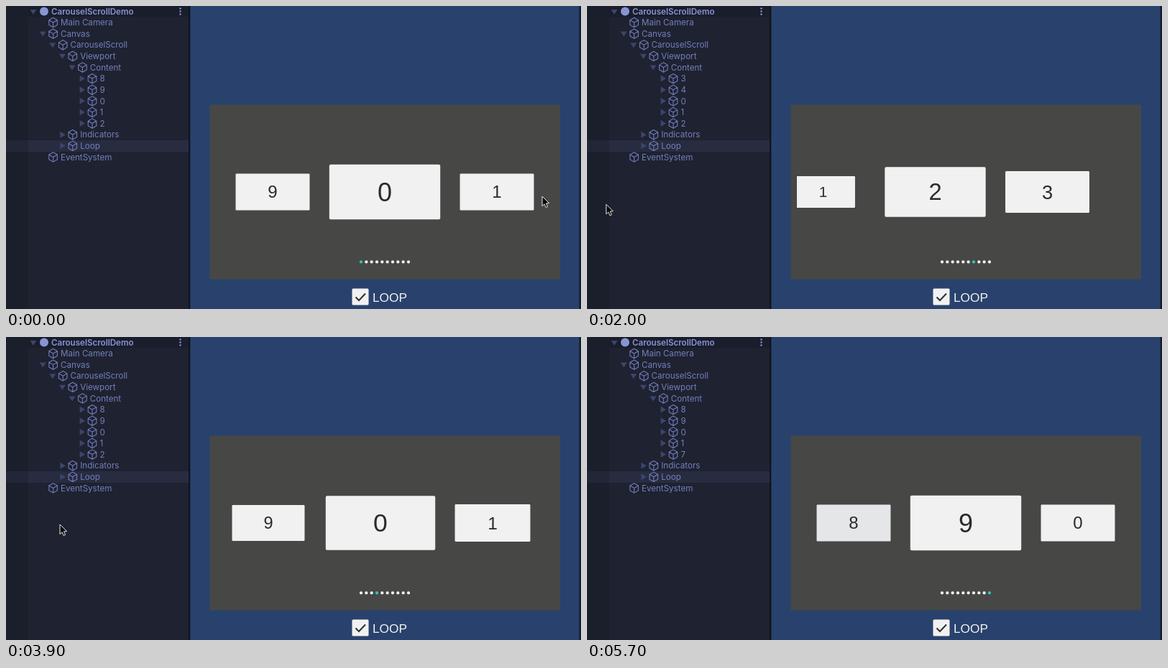
Recreate the animation shown at these times as an HTML page with a canvas. Size 800 px wide and 422 px high, loop 5.8 s.

```html
<!DOCTYPE html>
<html lang="en">
<head>
<meta charset="utf-8">
<title>Carousel scroll</title>
<style>
html, body { margin: 0; width: 100%; height: 100%; overflow: hidden; background: #29426d; }
canvas { display: block; width: 800px; height: 422px; }
</style>
</head>
<body>
<canvas id="stage" width="800" height="422"></canvas>
<script>
const ctx = document.getElementById('stage').getContext('2d');
const LOOP = 5800, STEP = 100;
const MID_X = 527, MID_Y = 259, GAP = 156;
const UI = 'Inter, "Noto Sans", sans-serif';
const SANS = '"Liberation Sans", Arial, sans-serif';

// Each flick: a drag until release, then a glide that settles on a card.
const flicks = [
  { start: 40, release: 300, from: 0, at: 4.2, to: 7, tau: 150 },
  { start: 1780, release: 1980, from: 7, at: 11.75, to: 16, tau: 152.5 },
  { start: 3000, release: 3200, from: 16, at: 18.48, to: 26, tau: 160 },
  { start: 3650, release: 3880, from: 25.55, at: 29.546, to: 33, tau: 130 },
  { start: 5020, release: 5260, from: 33, at: 37.2, to: 39, tau: 100 }
];

// Pointer path: time, x, y
const path = [
  [0, 746, 265], [40, 746, 265], [300, 90, 270], [700, 62, 275], [1000, 70, 272],
  [1200, 322, 254], [1300, 324, 255], [1500, 600, 262], [1780, 718, 268],
  [1980, 30, 275], [2150, 2, 285], [2400, 3, 300], [2440, 700, 262],
  [2500, 655, 308], [2700, 735, 300], [3000, 740, 290], [3200, 400, 275],
  [3300, 355, 271], [3420, 500, 270], [3650, 745, 265], [3880, 90, 262],
  [3900, 75, 261], [4200, 85, 270], [4400, 250, 285], [4600, 535, 289],
  [4800, 735, 280], [5020, 745, 275], [5260, 80, 270], [5500, 200, 265],
  [5620, 375, 262], [5800, 375, 262]
];

const mod = (n, m) => ((n % m) + m) % m;
const mix = (a, b, k) => a + (b - a) * k;

function scrollAt(t) {
  let pos = 0;
  for (const f of flicks) {
    if (t < f.start) break;
    if (t < f.release) {
      pos = mix(f.from, f.at, (t - f.start) / (f.release - f.start));
    } else {
      const rest = (f.to - f.at) * Math.exp((f.release - t) / f.tau);
      pos = f.to - (rest < 0.03 ? 0 : rest);
    }
  }
  return pos;
}

function activeAt(t) {
  let index = 0;
  for (const f of flicks) if (t >= f.release) index = f.to;
  return mod(index, 10);
}

function pointerAt(t) {
  let i = 1;
  while (i < path.length - 1 && path[i][0] < t) i++;
  const a = path[i - 1], b = path[i];
  const k = Math.max(0, Math.min(1, (t - a[0]) / (b[0] - a[0])));
  return [mix(a[1], b[1], k), mix(a[2], b[2], k)];
}

function cardBox(index, pos) {
  const d = index - pos;
  const s = 1 - Math.abs(d) / 3;
  return { x: MID_X + d * GAP, s, w: 154.4 * s, h: 76.4 * s };
}

function hoveredAt(t) {
  const pos = scrollAt(t), [x, y] = pointerAt(t);
  for (let i = Math.round(pos) - 2; i <= Math.round(pos) + 2; i++) {
    const c = cardBox(i, pos);
    if (Math.abs(x - c.x) < c.w / 2 && Math.abs(y - MID_Y) < c.h / 2) return i;
  }
  return null;
}

function rect(x, y, w, h, fill) {
  ctx.fillStyle = fill;
  ctx.fillRect(x, y, w, h);
}

function round(x, y, w, h, r, fill) {
  ctx.fillStyle = fill;
  ctx.beginPath();
  ctx.roundRect(x, y, w, h, r);
  ctx.fill();
}

function dot(x, y, r, fill) {
  ctx.fillStyle = fill;
  ctx.beginPath();
  ctx.arc(x, y, r, 0, Math.PI * 2);
  ctx.fill();
}

function poly(points, fill) {
  ctx.beginPath();
  points.forEach(([x, y]) => ctx.lineTo(x, y));
  ctx.closePath();
  if (fill) {
    ctx.fillStyle = fill;
    ctx.fill();
  }
}

function text(str, x, y, font, fill, align = 'left') {
  ctx.font = font;
  ctx.fillStyle = fill;
  ctx.textAlign = align;
  ctx.fillText(str, x, y);
}

function cube(x, y) {
  const hex = [];
  for (let i = 0; i < 6; i++) {
    const a = (i + 0.5) * Math.PI / 3;
    hex.push([x + Math.cos(a) * 6.7, y + Math.sin(a) * 6.7]);
  }
  ctx.strokeStyle = '#6f7dbb';
  ctx.lineWidth = 1.1;
  ctx.lineJoin = 'round';
  poly(hex);
  // Inner edges: down, upper left, upper right
  for (const i of [1, 3, 5]) {
    ctx.moveTo(x, y);
    ctx.lineTo(...hex[i]);
  }
  ctx.stroke();
}

function fold(x, y, open) {
  const shape = open
    ? [[x - 4.5, y - 3], [x + 4.5, y - 3], [x, y + 4]]
    : [[x - 3, y - 4.5], [x + 4.5, y], [x - 3, y + 4.5]];
  poly(shape, '#3c456b');
}

function drawTree(center) {
  rect(0, 0, 255, 422, '#1f2230');
  rect(0, 0, 255, 15, '#1a1d2b');
  rect(0, 0, 31, 422, '#1b1e2b');
  rect(0, 187, 255, 16, '#282c40');
  rect(0, 187, 31, 16, '#222637');
  rect(254, 0, 2.5, 422, '#11141f');

  fold(38, 8, true);
  dot(53, 7.4, 6, '#8795d4');
  text('CarouselScrollDemo', 63, 11.6, '600 11.6px ' + UI, '#8795d4');
  for (const y of [3.5, 7.5, 11.5]) dot(242.5, y, 1.2, '#8795d4');

  // Five pooled items, each slot reused by the index that lands on it.
  const items = [];
  for (let i = center - 2; i <= center + 2; i++) items[mod(i + 2, 5)] = mod(i, 10);
  const rows = [
    ['Main Camera', 0, ''], ['Canvas', 0, 'open'], ['CarouselScroll', 1, 'open'],
    ['Viewport', 2, 'open'], ['Content', 3, 'open'],
    ...items.map(n => [String(n), 4, 'shut']),
    ['Indicators', 2, 'shut'], ['Loop', 2, 'shut'], ['EventSystem', 0, '']
  ];
  rows.forEach(([label, depth, state], i) => {
    const x = 65.6 + depth * 13.6, y = 23 + i * 15.62;
    if (state) fold(x - 14.4, y, state === 'open');
    cube(x, y);
    text(label, x + 10.4, y + 4.2, '11.6px ' + UI, '#7280bd');
  });
}

function drawCarousel(t, pos) {
  rect(256.5, 0, 543.5, 422, '#29426d');
  rect(797.5, 0, 2.5, 422, '#151c2f');
  rect(283.5, 137.5, 487.5, 243, '#474846');

  ctx.save();
  ctx.beginPath();
  ctx.rect(292, 138, 470, 242);
  ctx.clip();
  const hover = hoveredAt(Math.max(0, t - 45));
  const near = Math.round(pos);
  for (let i = near - 2; i <= near + 2; i++) {
    const c = cardBox(i, pos);
    round(c.x - c.w / 2, MID_Y - c.h / 2, c.w, c.h, 2 * c.s,
      i === hover ? '#e5e6e7' : '#f1f1f1');
    const size = 36 * c.s;
    text(mod(i, 10), c.x, MID_Y + 0.35 * size, size + 'px ' + SANS, '#2b2b2b', 'center');
  }
  ctx.restore();

  const active = activeAt(t);
  for (let i = 0; i < 10; i++) {
    dot(494 + i * 7.33, 356.4, 2.1, i === active ? '#2cc8b9' : '#f4f4f4');
  }

  round(481.5, 393.5, 23, 23, 1.5, '#f1f1f1');
  ctx.strokeStyle = '#303030';
  ctx.lineWidth = 2;
  ctx.lineJoin = 'miter';
  ctx.beginPath();
  ctx.moveTo(486.5, 405.5);
  ctx.lineTo(491, 410);
  ctx.lineTo(500, 400.5);
  ctx.stroke();
  text('LOOP', 510, 411.5, '17.3px ' + SANS, '#f1f1f1');
}

function drawPointer(x, y) {
  const shape = [[0, 0], [0, 13.6], [3, 10.8], [5.2, 15.6], [7.6, 14.5],
    [5.5, 9.9], [9.6, 9.6]];
  poly(shape.map(([a, b]) => [x + a, y + b]), '#0a0a0a');
  ctx.strokeStyle = '#e8e8e8';
  ctx.lineWidth = 1;
  ctx.lineJoin = 'round';
  ctx.stroke();
}

function draw(t) {
  const pos = scrollAt(t);
  drawTree(Math.round(scrollAt(Math.max(0, t - 20))));
  drawCarousel(t, pos);
  if (t < 5650) drawPointer(...pointerAt(t));
}

const begin = performance.now();
function tick() {
  const t = (performance.now() - begin) % LOOP;
  draw(Math.floor(t / STEP) * STEP);
  requestAnimationFrame(tick);
}
tick();
</script>
</body>
</html>
```
